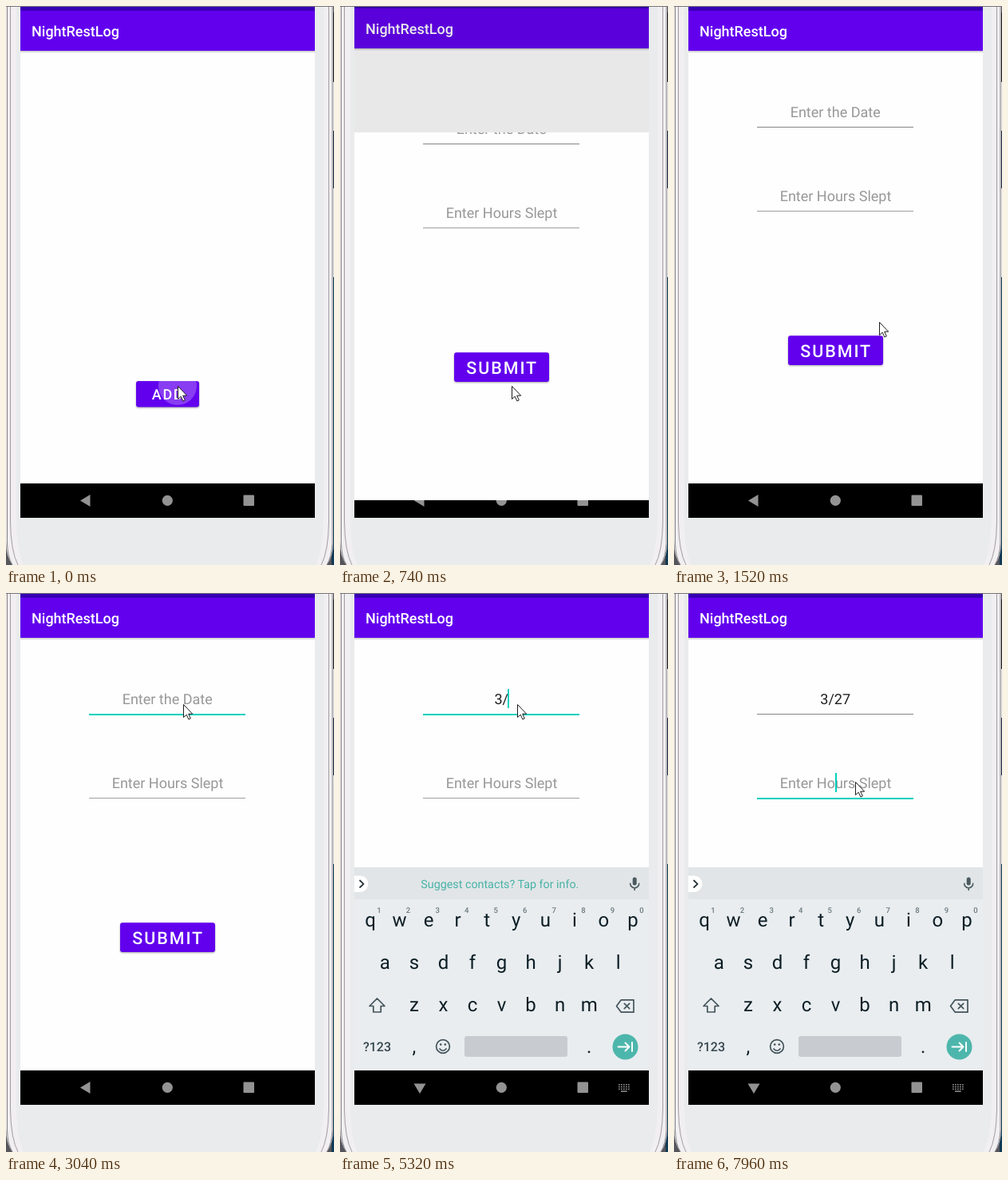
Animation, 411 px wide and 699 px high, one loop 8 s. Source, as an HTML page:

```html
<!DOCTYPE html>
<html lang="en">
<head>
<meta charset="utf-8">
<title>Sleep log demo</title>
<style>
  html, body { margin: 0; width: 100%; height: 100%; overflow: hidden; background: #e9ebec; }
  svg { display: block; }
  text { font-family: Roboto, sans-serif; text-rendering: geometricPrecision; }
  .mid { text-anchor: middle; }
  .bold { font-weight: 500; }
  .caps { font-weight: 500; letter-spacing: .0892em; fill: #fff; }
  .line { fill: none; stroke-linecap: round; stroke-linejoin: round; }
</style>
</head>
<body>
<svg id="stage" width="411" height="699" viewBox="0 0 411 699">
  <defs>
    <clipPath id="screen"><rect x="18" y="1" width="369" height="639"/></clipPath>
    <clipPath id="reveal"><rect id="revealBox" x="18" y="0" width="369" height="640"/></clipPath>
    <clipPath id="addClip"><rect x="163" y="469" width="79" height="32.5" rx="3"/></clipPath>
    <linearGradient id="fade" x2="0" y2="1">
      <stop stop-color="#000" stop-opacity=".24"/>
      <stop offset="1" stop-color="#000" stop-opacity="0"/>
    </linearGradient>
    <g id="header">
      <rect x="18" y="-20" width="369" height="26" fill="#3700b3"/>
      <rect x="18" y="6" width="369" height="50" fill="#6200ee"/>
      <rect x="18" y="56" width="369" height="3" fill="url(#fade)"/>
      <text class="bold" x="32" y="38" font-size="18" fill="#fff">NightRestLog</text>
    </g>
  </defs>

  <!-- phone body -->
  <rect width="411" height="699" fill="#55555c"/>
  <g>
    <rect x="408" y="8" width="3" height="87" fill="#17181c"/>
    <rect x="408" y="95" width="3" height="61" fill="#d8d8da"/>
    <rect x="408" y="156" width="3" height="72" fill="#16283f"/>
    <rect x="408" y="228" width="3" height="111" fill="#dcdcde"/>
    <rect x="408" y="339" width="3" height="360" fill="#123a55"/>
  </g>
  <path d="M0 0V670Q0 688 8 699H402Q410 688 410 670V0Z" fill="#f1eff1"/>
  <path d="M13 0V640Q13 682 22 699H388Q397 682 398 640V0Z" fill="#e9ebec"/>
  <g class="line">
    <path d="M1.5 0V672Q2 689 8 699M409 0V672Q408 689 402 699" stroke="#858185"/>
    <path d="M5.5 0V645Q6 682 15 699M404.5 0V645Q404 682 395 699" stroke="#a29ca0"/>
  </g>
  <rect width="411" height="1" fill="#76747a"/>

  <g clip-path="url(#screen)">
    <rect x="18" y="0" width="369" height="640" fill="#fefefe"/>
    <g id="home">
      <rect x="18" y="0" width="369" height="640" fill="#fefefe"/>
      <use href="#header"/>
      <rect id="addBox" x="163" y="469" width="79" height="32.5" rx="3" fill="#6200ee"/>
      <text class="caps" x="182.8" y="492.2" font-size="18">ADD</text>
      <g clip-path="url(#addClip)"><circle id="ripple" r="24" fill="#fff" fill-opacity=".24"/></g>
    </g>
    <rect id="dim" x="18" y="0" width="369" height="640"/>

    <rect x="18" y="597" width="369" height="43"/>
    <g fill="#939393">
      <path id="back" d="M-6.5 0L6 -7.5V7.5Z"/>
      <circle cx="202.3" cy="618.3" r="6.6"/>
      <rect x="297.5" y="611.5" width="13.5" height="13.5" rx="1"/>
      <g id="imeIcon"></g>
    </g>

    <g clip-path="url(#reveal)">
      <g id="form">
        <rect x="18" y="0" width="369" height="597" fill="#fefefe"/>
        <use href="#header"/>
        <text id="dateText" class="mid" x="202.2" y="139" font-size="18"></text>
        <text class="mid" x="202.5" y="244.2" font-size="18" fill="#989898">Enter Hours Slept</text>
        <rect x="104" y="151" width="196" height="1" fill="#868686"/>
        <rect x="104" y="256" width="196" height="1" fill="#a0a0a0"/>
        <rect id="focusA" x="104" y="151" width="196" height="2" fill="#03d0bd"/>
        <rect id="focusB" x="104" y="256" width="196" height="2" fill="#03d0bd"/>
        <rect id="caretA" y="120" width="2" height="24" fill="#03d0bd"/>
        <rect id="caretB" x="202" y="225" width="2" height="24" fill="#03d0bd"/>
        <rect x="143" y="412.2" width="119" height="36.8" rx="3" fill="#6200ee"
              style="filter:drop-shadow(0 1px 1px rgba(0,0,0,.35))"/>
        <text class="caps" x="158.3" y="439.2" font-size="21.5">SUBMIT</text>
      </g>
    </g>

    <g id="keyboard">
      <rect x="18" y="343" width="369" height="254" fill="#e9edf0"/>
      <rect x="18" y="343" width="369" height="40" fill="#e1e5e7"/>
      <path d="M18 353.5H26A10.3 10.3 0 0 1 26 374H18Z" fill="#fff"/>
      <path class="line" d="M25 359.5L29.5 363.8L25 368" stroke="#263238" stroke-width="1.8"/>
      <text id="hintStrip" x="101.3" y="369" font-size="14.3" fill="#46b3a6">Suggest contacts? Tap for info.</text>
      <rect x="366.7" y="355.5" width="5" height="10" rx="2.5" fill="#4b5a61"/>
      <path class="line" d="M363.7 363.2A5.5 5.5 0 0 0 374.7 363.2M369.2 369V371.4" stroke="#4b5a61" stroke-width="1.6"/>
      <g id="keys" fill="#0c1e25"></g>
      <g class="line" stroke="#44545b" stroke-width="1.7">
        <path d="M46.5 507L56 516.5H51.2V524H41.8V516.5H37Z"/>
        <path d="M352.3 508.8H368V524.2H352.3L346.5 516.5Z"/>
        <path d="M356.3 513.3L362.7 519.7M362.7 513.3L356.3 519.7"/>
        <circle cx="129" cy="567" r="8.4"/>
        <path d="M125 570Q129 574.5 133 570"/>
      </g>
      <circle cx="126.2" cy="564.6" r="1.3" fill="#44545b"/>
      <circle cx="131.8" cy="564.6" r="1.3" fill="#44545b"/>
      <text class="mid bold" x="46.5" y="572.7" font-size="16" fill="#37474f">?123</text>
      <rect x="156" y="554" width="129" height="26" rx="3" fill="#c8ccd0"/>
      <circle cx="357.5" cy="567.5" r="16" fill="#4db6ac"/>
      <path class="line" d="M348.5 567.5H362M357.5 562.5L362.5 567.5L357.5 572.5M366 562V573" stroke="#fff" stroke-width="1.9"/>
    </g>
  </g>
  <path id="mouse" d="M.5 .5V16.5L4.2 13.2L6.9 19L9.3 17.9L6.7 12.2H11.7Z" fill="#fff" stroke="#1c1c1c" stroke-linejoin="round"/>
</svg>
<script>
const $ = id => document.getElementById(id);
const NS = 'http://www.w3.org/2000/svg';
const LOOP = 8000;

const TICKS = [0, 120, 270, 430, 740, 860, 1020, 1190, 1350, 1520, 1650, 1770,
  1920, 2060, 2200, 2340, 2480, 2620, 2760, 3040, 3520, 3670,
  4100, 4220, 4370, 4520, 4670, 5040, 5320, 5730, 5880, 6310,
  6870, 7030, 7180, 7340, 7500, 7650, 7810, 7960];

// Pointer: time, x, y
const PATH = [[0, 215, 475], [1020, 215, 475], [1520, 256.5, 395], [1770, 250, 134],
  [1920, 238, 104], [2200, 221.5, 139], [6870, 221.5, 139], [7180, 234, 262],
  [7340, 235, 273], [7600, 226.5, 236]];

const TYPED = [[4520, '3'], [5320, '3/'], [5880, '3/2'], [6310, '3/27']];
const BLINK = [[2620, 3040], [3520, 4100], [4520, 5040], [5320, 5730], [5880, 6870]];

const clamp = v => Math.max(0, Math.min(1, v));
const ramp = (t, a, b) => clamp((t - a) / (b - a));
const mix = (a, b, u) => a + (b - a) * u;
const set = (id, attrs) => { for (const k in attrs) $(id).setAttribute(k, attrs[k]); };
const show = (id, v) => set(id, { opacity: +v });

function add(parent, tag, attrs, text = '') {
  const el = document.createElementNS(NS, tag);
  for (const k in attrs) el.setAttribute(k, attrs[k]);
  el.textContent = text;
  $(parent).append(el);
}

function buildKeys() {
  const pitch = 36.55, left = 202.5 - 4.5 * pitch;
  const key = (c, col, y, look) =>
    add('keys', 'text', { class: 'mid', x: left + col * pitch, y, 'font-size': 24, ...look }, c);
  const row = (letters, col, y) => [...letters].forEach((c, i) => key(c, col + i, y));
  row('qwertyuiop', 0, 417);
  row('asdfghjkl', .5, 469.7);
  row('zxcvbnm', 1.5, 522.6);
  key(',', 1.5, 575);
  key('.', 7.5, 575);
  [...'1234567890'].forEach((c, i) =>
    key(c, i + .3, 399.5, { class: 'mid bold', 'font-size': 9.5, fill: '#6d7a80' }));
  for (let r = 0; r < 3; r++)
    for (let c = 0; c < 5; c++)
      add('imeIcon', 'rect', { x: 349 + c * 3, y: 614 + r * 2.8, width: 1.7, height: 1.5 });
  add('imeIcon', 'rect', { x: 352, y: 622.4, width: 7.7, height: 1.5 });
}

function pointer(t) {
  let i = PATH.length - 1;
  while (i && PATH[i][0] > t) i--;
  const a = PATH[i], b = PATH[i + 1] || a;
  const u = b === a ? 0 : ramp(t, a[0], b[0]);
  return [Math.round(mix(a[1], b[1], u)), Math.round(mix(a[2], b[2], u))];
}

function drawHome(t) {
  const press = ramp(t, 0, 400);
  set('ripple', { cx: mix(215, 202.5, press), cy: mix(475, 485.5, press), r: mix(24, 62, press) });
  $('addBox').style.filter =
    `drop-shadow(0 ${mix(1, 3, press)}px ${mix(1, 2, press)}px rgba(0,0,0,.35))`;
}

function drawOpening(t) {
  const u = ramp(t, 700, 1020);
  const p = 1 - (1 - u) ** 1.86;
  const open = t >= 740;
  set('home', { transform: `translate(0 ${Math.round(-13 * p)})` });
  show('dim', open ? .085 : 0);
  show('form', open);
  set('form', { transform: `translate(0 ${Math.round(27 * (1 - p))})` });
  set('revealBox', { y: Math.round(600 * (1 - u) ** 10) });
}

function drawFields(t) {
  const typed = TYPED.filter(s => s[0] <= t).pop();
  const label = $('dateText');
  label.textContent = typed ? typed[1] : 'Enter the Date';
  label.setAttribute('fill', typed ? '#202020' : '#989898');
  const half = typed ? label.getComputedTextLength() / 2 : 0;
  set('caretA', { x: Math.round(201.3 + half) });
  show('caretA', BLINK.some(([a, b]) => t >= a && t < b));
  show('caretB', t >= 7960);
  show('focusA', ramp(t, 2300, 2600) * (1 - ramp(t, 7720, 7950)));
  show('focusB', ramp(t, 7660, 7900));
}

function drawKeyboard(t) {
  const u = ramp(t, 4060, 4380);
  show('keyboard', u);
  set('keyboard', { transform: `translate(0 ${128 * (1 - u)})` });
  show('hintStrip', t < 7960);
  const turn = ramp(t, 3440, 3640);
  set('back', { transform: `translate(${mix(99.5, 100, turn)} ${mix(618.5, 619.5, turn)}) rotate(${-90 * turn})` });
  show('imeIcon', turn);
}

function render(time) {
  const t = TICKS.filter(v => v <= time).pop();
  drawHome(t);
  drawOpening(t);
  drawFields(t);
  drawKeyboard(t);
  set('mouse', { transform: `translate(${pointer(t)})` });
}

buildKeys();
const start = performance.now();
function frame() {
  render((performance.now() - start) % LOOP);
  requestAnimationFrame(frame);
}
frame();
</script>
</body>
</html>
```
